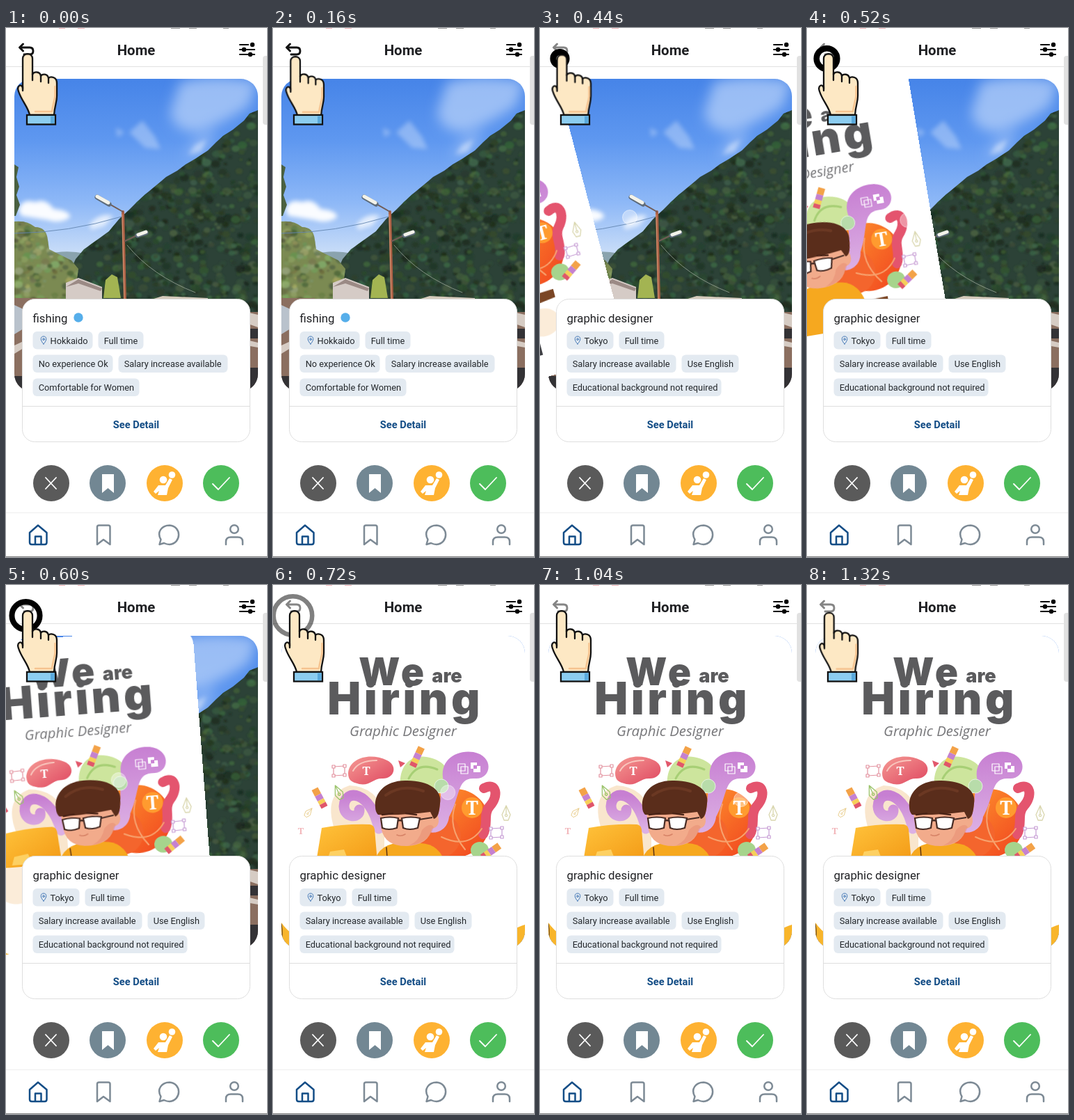
These frames come from a looping animation (375 by 760 pixels, 1.36 s). An HTML page:

```html
<!DOCTYPE html>
<html lang="en">
<head>
<meta charset="utf-8">
<title>Job cards</title>
<style>
html, body { margin: 0; width: 100%; height: 100%; overflow: hidden; background: #fff; }
svg { position: absolute; left: 0; top: 0; width: 375px; height: 760px; overflow: hidden; }
svg * { animation-duration: 1360ms; animation-iteration-count: infinite; animation-timing-function: linear; }
text { font-family: Roboto, sans-serif; fill: #202124; }
.chip text { font-size: 12.8px; fill: #24282c; }
.chip rect { fill: #e3eaf1; }
.role { font-size: 16.8px; }
.line { fill: none; stroke-linecap: round; stroke-linejoin: round; }
.black { font-family: Inter, sans-serif; font-weight: 900; fill: #5b5b5d; }
.serif { font-family: "Noto Serif", serif; font-weight: 700; fill: #fff; text-anchor: middle; }

.before { animation-name: before; }
.after { animation-name: after; }
#photo { animation-name: photo; }
#card { transform-origin: 187px 297px; animation-name: card; }
#ring { animation-name: ring; }
#touch { animation-name: touch; }
#hand { transform-origin: 73px 139px; animation-name: press; }

@keyframes before { 0%, 26.46% { opacity: 1 } 26.47%, 100% { opacity: 0 } }
@keyframes after { 0%, 26.46% { opacity: 0 } 26.47%, 100% { opacity: 1 } }
@keyframes photo { 0%, 49.26% { opacity: 1 } 49.27%, 100% { opacity: 0 } }
@keyframes card {
  0%, 26.46% { transform: translateX(-600px) }
  26.47% { transform: translateX(-400px) rotate(-20.5deg) }
  32.35% { transform: translateX(-287px) rotate(-14.7deg) }
  44.12% { transform: translateX(-78px) rotate(-4.4deg) }
  49.26%, 100% { transform: none }
}
@keyframes ring {
  0%, 26.46% { r: 5px; stroke-width: 9px; opacity: 0 }
  26.47% { r: 5px; stroke-width: 9px; opacity: 1 }
  32.35% { r: 9.5px; stroke-width: 9px }
  44.12% { r: 20px; stroke-width: 8px; opacity: 1 }
  52.94% { r: 27.7px; stroke-width: 6.5px; opacity: .5 }
  61.76%, 100% { r: 33px; stroke-width: 5px; opacity: 0 }
}
@keyframes touch {
  0%, 11.76% { transform: translate(129px, 272px); opacity: 0 }
  17.65%, 33% { transform: translate(129px, 272px); opacity: 1 }
  44.12% { transform: translate(161px, 280px) }
  52.94% { transform: translate(251px, 298px) }
  64.7% { transform: translate(286px, 307px) }
  76.47% { transform: translate(289px, 308px); opacity: 1 }
  82.35%, 100% { transform: translate(289px, 308px); opacity: 0 }
}
@keyframes press {
  0% { transform: none }
  17.6%, 22% { transform: scale(.96, .943) }
  32.35% { transform: scale(.99, .985) }
  38.24%, 85.3% { transform: none }
  97.06%, 100% { transform: scale(.98, .973) }
}
</style>
</head>
<body>

<!-- Landscape photo -->
<svg id="photo" viewBox="0 0 375 760">
  <defs>
    <linearGradient id="sky" x2="0" y2="1">
      <stop offset="0" stop-color="#4684e8"/><stop offset=".2" stop-color="#5f98f0"/>
      <stop offset=".4" stop-color="#8fb9f7"/><stop offset=".55" stop-color="#c6dbf8"/>
    </linearGradient>
    <filter id="soft" x="-40%" y="-40%" width="180%" height="180%"><feGaussianBlur stdDeviation="9"/></filter>
    <filter id="haze" x="-30%" y="-30%" width="160%" height="160%"><feGaussianBlur stdDeviation="3"/></filter>
    <filter id="fine"><feGaussianBlur stdDeviation=".8"/></filter>
    <clipPath id="frame"><rect x="12" y="73" width="350" height="449" rx="25"/></clipPath>
    <clipPath id="hillClip"><path id="hillPath" d="M362 118L350 123 342 133 326 146 312 155 302 164 290 176 272 188 258 196 246 205 230 214 216 226 200 239 188 250 176 262 162 275 148 292 130 305 112 318 100 332 92 350 88 365V410H362Z"/></clipPath>
    <clipPath id="bushClip"><path id="bushPath" d="M12 278Q30 276 42 286 58 286 60 304L62 318 78 326 94 334 104 346 100 375 80 395H12Z"/></clipPath>
  </defs>
  <g clip-path="url(#frame)">
    <path fill="url(#sky)" d="M0 73H375V522H0Z"/>
    <g filter="url(#soft)" fill="#b4cff8">
      <path opacity=".75" d="M250 78Q290 65 362 76L350 112Q310 138 275 150 240 148 236 122Z"/>
      <path opacity=".6" d="M255 188L268 165 300 145 290 172Z"/>
    </g>
    <g filter="url(#haze)" fill="#fff">
      <path opacity=".95" d="M18 262Q22 244 42 250 58 244 68 260 92 262 92 272 78 282 60 276L22 270Z"/>
      <path opacity=".7" d="M120 282Q136 264 154 270L142 284 122 290Z"/>
      <path opacity=".3" d="M177 150L196 133 214 156 222 174 200 172ZM158 143L170 150 160 157Z"/>
      <path opacity=".4" d="M262 182L272 168 288 160 280 178Z"/>
    </g>
    <path fill="#8aa3ae" d="M58 325Q85 318 114 324L120 345H60Z"/>
    <use href="#hillPath" fill="#2c4237"/>
    <g clip-path="url(#hillClip)"><g id="hill" filter="url(#fine)"></g></g>
    <use href="#bushPath" fill="#7b8a52"/>
    <g clip-path="url(#bushClip)"><g id="bush" filter="url(#fine)"></g></g>
    <path fill="#4a6040" d="M12 196L18 200 15 214 19 228 15 240 20 254 14 270H12Z"/>
    <path fill="#d5cbc6" d="M86 366L104 359 138 372V392H86Z"/>
    <path fill="#9b8a85" d="M86 372L104 361 138 374 136 378 104 367Z"/>
    <path fill="#a3b452" d="M140 388L143 362 152 354 160 358 165 388Z"/>
    <path fill="#d5cabb" d="M206 391L225 385 290 388V402H206Z"/>
    <path fill="#8b6f60" d="M0 388H60V522H0ZM340 408H362V522H340Z"/>
    <path fill="#b9c2cc" d="M12 398L25 404V432L12 440Z"/>
    <path fill="#d6ccc4" d="M12 456L25 450V460L12 468ZM345 408L362 412V430L345 424ZM345 448L362 452V459L345 456Z"/>
    <path fill="#333235" d="M12 500H30V522H12ZM345 432H362V446H345ZM345 488H362V522H345Z"/>
    <path class="line" stroke="#6486b0" stroke-width=".9" d="M12 295Q90 294 166 271"/>
    <path class="line" stroke="#8e9a8c" stroke-width=".9" d="M174 312Q210 356 272 380"/>
    <path class="line" stroke="#ad6045" stroke-width="4" d="M168 264L171 392"/>
    <path class="line" stroke="#d59a78" stroke-width="1" d="M167 268L170 390"/>
    <path class="line" stroke="#705c56" stroke-width="2" d="M147 252L168 264M171 306L188 298"/>
    <path class="line" stroke="#5d6b7a" stroke-width="7" d="M131 243L148 253M189 298L201 294"/>
    <path class="line" stroke="#f3f3ea" stroke-width="5" d="M131 242L147 251M190 297L201 293"/>
  </g>
</svg>

<!-- Returning card -->
<svg viewBox="0 0 375 760">
  <defs>
    <clipPath id="cardClip"><rect x="12" y="73" width="350" height="449" rx="25"/></clipPath>
    <linearGradient id="warm" x2="1" y2="1"><stop stop-color="#ff9a2e"/><stop offset="1" stop-color="#f0411f"/></linearGradient>
    <linearGradient id="rose" x2="1" y2="1"><stop stop-color="#f59a94"/><stop offset="1" stop-color="#df4760"/></linearGradient>
    <linearGradient id="lilac" x2="0" y2="1"><stop stop-color="#c77fd2"/><stop offset="1" stop-color="#dcb0e4"/></linearGradient>
    <linearGradient id="gold" x2="1" y2="1"><stop stop-color="#ffc33b"/><stop offset="1" stop-color="#f39a16"/></linearGradient>
    <g id="crop" class="line" stroke-width="1.2">
      <path d="M-8-6L8-7 8 6-8 7Z"/><path d="M-10-8h4v4h-4zM6-9h4v4h-4zM6 4h4v4h-4zM-10 5h4v4h-4z" fill="#fff"/>
    </g>
    <g id="stripes">
      <path fill="#f3a248" d="M-5-15H5V-5H-5Z"/><path fill="#c581cf" d="M-5-5H5V3H-5Z"/>
      <path fill="#f6cf58" d="M-5 3H5V9H-5Z"/><path fill="#e0566a" d="M-5 9H5V15H-5Z"/>
    </g>
    <g id="nib" class="line" stroke-width="1.3"><path d="M0-11L6 2 3 10H-3L-6 2ZM0-11V1"/><circle cy="3" r="1.6"/></g>
  </defs>
  <g id="card">
    <rect x="12" y="73" width="350" height="449" rx="25" fill="#fff"/>
    <g clip-path="url(#cardClip)">
      <g text-anchor="middle">
        <text class="black" x="172" y="144" font-size="55" letter-spacing="4">We</text>
        <text class="black" x="250" y="140" font-size="27">are</text>
        <text class="black" x="190" y="186" font-size="64" letter-spacing="4.5">Hiring</text>
        <text x="187" y="217" font-size="20.4" font-style="italic" style="font-family:'Open Sans',sans-serif;fill:#77777a">Graphic Designer</text>
      </g>

      <path fill="#f9e6cd" d="M88 350Q72 300 110 288 150 290 160 330V395H90Z"/>
      <ellipse cx="82" cy="424" rx="30" ry="27" fill="#fbecd9"/>
      <ellipse cx="255" cy="445" rx="24" ry="20" fill="#fbecd9"/>
      <path class="line" stroke="url(#lilac)" stroke-width="15" d="M152 350C140 295 103 292 102 318 103 336 125 335 124 323"/>
      <path fill="#cde59d" d="M183 290C180 255 203 240 229 249 257 258 255 280 242 290L220 306Z"/>
      <path class="line" stroke="#a7cf75" stroke-width="3" d="M195 278Q208 253 236 265"/>
      <circle cx="262" cy="342" r="49" fill="url(#warm)"/>
      <circle cx="238" cy="360" r="32" fill="#f4652d"/>
      <ellipse cx="297" cy="381" rx="13" ry="12" fill="#a6d48c"/>
      <path class="line" stroke="#e4546e" stroke-width="14" d="M303 292C322 282 324 304 312 317 301 329 310 343 302 358"/>
      <path fill="url(#lilac)" d="M245 281C238 253 262 236 288 240 319 246 314 280 290 278 264 276 270 302 253 333 250 360 220 359 219 350 247 337 236 309 245 281Z"/>
      <path class="line" stroke="#f7a26e" stroke-width="2" d="M242 362Q280 380 300 350M262 315Q250 348 276 380"/>
      <circle cx="286" cy="320" r="15" fill="#ff9b2f"/>
      <text class="serif" x="286" y="330" font-size="27">T</text>
      <path fill="url(#rose)" d="M108 270C110 248 140 240 164 252 180 260 174 278 158 278 144 277 140 289 124 286 112 283 108 280 108 270Z"/>
      <path class="line" stroke="#f9c6bd" stroke-width="2" d="M115 267Q123 252 149 252"/>
      <text class="serif" x="134" y="273" font-size="17">T</text>
      <path class="line" stroke="#fff" stroke-width="1.2" d="M266 257h10v10h-10zM270 261h10v10h-10z"/>
      <path fill="#fff" d="M284 255H293V260H298V269H288V264H284Z"/>
      <path fill="#cb83d5" d="M288 259H293V264H288Z"/>
      <circle cx="242" cy="289" r="10" fill="#b8dcaa" stroke="#e4f3df"/>

      <use href="#crop" x="95" y="267" stroke="#e3929f"/>
      <use href="#crop" x="321" y="356" stroke="#c59ad3"/>
      <use href="#stripes" transform="translate(207 247) rotate(25)"/>
      <use href="#stripes" transform="translate(67 306) rotate(-28)"/>
      <use href="#stripes" transform="translate(313 383) rotate(55)"/>
      <use href="#nib" transform="translate(94 298) rotate(-25)" fill="#b6d68b" stroke="#9bc36b"/>
      <use href="#nib" transform="translate(335 328)" stroke="#d9d6ae"/>
      <use href="#nib" transform="translate(51 327) rotate(40) scale(.7)" stroke="#e9ce8e"/>
      <path fill="#e2586c" d="M180 252L190 256 183 262Z"/>
      <text class="serif" x="40" y="358" font-size="13" style="fill:#f2b8bc">T</text>

      <path fill="#f6a81f" d="M142 412Q147 372 180 371H212Q240 372 248 402V440H142Z"/>
      <path class="line" stroke="#5c3312" stroke-width="1.5" d="M163 377L164 391"/>
      <path fill="url(#gold)" d="M70 349Q102 343 139 344 145 345 146 351L150 398H62Z"/>
      <path fill="#ffdc77" opacity=".75" d="M82 383L102 380 108 395H78Z"/>
      <path fill="#f2ab8b" d="M152 318Q154 301 190 300 232 300 233 328 238 328 238 340 237 349 228 350 224 373 193 375 162 376 156 352Z"/>
      <path fill="#e88c72" opacity=".5" d="M214 352Q226 340 231 348 222 372 196 374 210 368 214 352Z"/>
      <path fill="#5a2d1b" d="M147 319C145 300 160 281 190 281 222 280 244 294 240 314 239 326 237 335 231 336L226 326Q190 331 151 330Q147 326 147 319Z"/>
      <path class="line" stroke="#774029" stroke-width="4" opacity=".6" d="M162 302Q185 285 216 296"/>
      <path class="line" stroke="#4a2417" stroke-width="2.5" d="M157 330L172 328M191 328L206 330"/>
      <g fill="#fff" stroke="#472c25" stroke-width="2.2">
        <path d="M155 335Q168 332 180 335L178 349Q166 353 157 349ZM185 335Q198 332 211 335L208 349Q196 353 187 349Z"/>
        <path fill="none" d="M180 339Q182 337 185 339M210 337L229 334"/>
      </g>
      <path class="line" stroke="#d78367" stroke-width="1.6" d="M178 359Q184 362 190 358"/>
      <path fill="#7a4625" d="M235 404L281 402V414L235 420Z"/>
      <path fill="#3f4044" d="M238 468H243V490H238Z"/>
      <path fill="#f8b52b" d="M12 485Q26 506 64 522H12ZM362 488Q345 492 310 522H362Z"/>
      <path class="line" stroke="#6c4c22" stroke-width="1.2" d="M12 487Q14 497 13 505"/>
    </g>
  </g>
  <g id="touch"><circle r="10.5" fill="#fff" fill-opacity=".38" stroke="#fff" stroke-opacity=".5"/></g>
</svg>

<!-- Interface -->
<svg viewBox="0 0 375 760">
  <defs><path id="undo" d="M24.500 23L19.500 28 24.500 33M20 28H34Q39 28 39 33T34 38H26"/></defs>
  <path fill="#fff" d="M0 0H375V55H0Z"/>
  <path stroke="#e2e2e2" d="M0 55.5H375"/>
  <path fill="#f4b9bd" d="M76 0h9v1h-9zM103 0h10v1h-10z"/>
  <path fill="#9c9c9c" d="M237 0h13v1h-13zM263 0h11v1h-11zM312 0h8v1h-8z"/>
  <text x="187" y="38.5" font-size="20.4" font-weight="700" text-anchor="middle">Home</text>
  <g class="line" stroke="#000" stroke-width="2.2">
    <path d="M336 24H348M336 31H339M346 31H357M336 38H347M354 38H357"/>
    <g fill="#000" stroke="none"><circle cx="354" cy="24" r="3.2"/><circle cx="342" cy="31" r="3.2"/><circle cx="351" cy="38" r="3.2"/></g>
  </g>
  <rect x="369" y="40" width="12" height="99" rx="4" fill="#e1e1e1"/>
  <g class="line" stroke-width="2.9">
    <use href="#undo" class="before" stroke="#111"/>
    <use href="#undo" class="after" stroke="#858585"/>
  </g>

  <rect x="23.500" y="389.500" width="327" height="205" rx="18" fill="#fff" stroke="#dedede"/>
  <path stroke="#dedede" d="M24 543.500H350"/>
  <text x="187" y="575" font-size="14.6" font-weight="700" text-anchor="middle" style="fill:#124c85">See Detail</text>
  <g class="before">
    <text class="role" x="38.500" y="423">fishing</text>
    <circle cx="104" cy="416" r="6.700" fill="#56aeea"/>
    <g id="jobA"></g>
  </g>
  <g class="after">
    <text class="role" x="38.500" y="423">graphic designer</text>
    <g id="jobB"></g>
  </g>

  <circle cx="65" cy="654" r="26" fill="#5a5a5a"/>
  <circle cx="146" cy="654" r="26" fill="#728793"/>
  <circle cx="228" cy="654" r="26" fill="#feb232"/>
  <circle cx="309" cy="654" r="26" fill="#4dbd5b"/>
  <path class="line" stroke="#fff" stroke-width="1.8" d="M57 646L72 662M72 646L57 662M297 655L305 663 321 646"/>
  <path fill="#fff" d="M138 641H155V668L146.500 661 138 668Z"/>
  <g fill="#fff">
    <circle cx="226" cy="649" r="5.300"/><circle cx="238.500" cy="642" r="4.800"/>
    <path d="M218 671L220 665 215 669 212 666 219 657H229L235 647 239 649 233 661 231 671Z"/>
  </g>

  <path stroke="#eee" d="M0 696.500H375"/>
  <path stroke="#858585" d="M0 759.500H375"/>
  <g class="line" stroke="#7d8a95" stroke-width="2.5">
    <path stroke="#134d86" d="M34 725L46 714.500 58.500 725V739Q58.500 742 55.500 742H37Q34 742 34 739ZM42 742V730.500H50.500V742"/>
    <path d="M131 717Q131 714.500 133.500 714.500H147Q149.500 714.500 149.500 717V742L140 735 131 742Z"/>
    <path d="M220.500 742L222.500 735C216 724 224 714.500 235 714.500 252.500 716 252.500 740 235 742 231 742 229 741 227 740Z"/>
    <circle cx="328" cy="720" r="5.800"/>
    <path d="M316 742V738Q316 731.500 323 731.500H333Q340 731.500 340 738V742"/>
  </g>

  <circle id="ring" cx="28.500" cy="44" fill="none" stroke="#000"/>
  <g id="hand" class="line" stroke="#111" stroke-width="2.3">
    <path fill="#fde8c4" d="M24 88V44C24 35 38 35 38 44V67C40 62 49 62 50 69 52 65 60 66 61 72 64 69 73 70 73 79V97C73 108 70 110 69 125H34C32 114 22 104 18 91 15 83 22 79 24 86Z"/>
    <path stroke="#f6c38f" stroke-width="2.5" d="M70.500 84V98C69 107 67 111 66 120H42"/>
    <path d="M24 84V90M38 66V75M50 69V77M61 72V79"/>
  </g>
  <rect x="30" y="125" width="41" height="13.500" fill="#8ccdf0" stroke="#111" stroke-width="2.300"/>
  <path fill="#5aa9dc" d="M64 126.500H69.500V137H64Z"/>
</svg>

<script>
const byId = id => document.getElementById(id);

// Chips: [x, y, width, label, has pin]
function chips(id, list) {
  byId(id).innerHTML = list.map(([x, y, w, label, pin]) => `
    <g class="chip"><rect x="${x}" y="${y}" width="${w}" height="25.500" rx="6"/>
    ${pin ? `<g transform="translate(${x + 15.5} ${y + 12.5})" class="line" stroke="#3f74b4">
      <path d="M0 5.500C-6-1-4-5.500 0-5.500S6-1 0 5.500Z"/><circle cy="-1.300" r="1.300"/></g>` : ""}
    <text x="${x + (pin ? 25 : 8.2)}" y="${y + 17.5}">${label}</text></g>`).join("");
}
chips("jobA", [
  [38.5, 436, 86, "Hokkaido", true], [132.5, 436, 65, "Full time"],
  [38.5, 469.5, 115, "No experience Ok"], [161.5, 469.5, 157, "Salary increase available"],
  [38.5, 503.5, 153, "Comfortable for Women"]
]);
chips("jobB", [
  [38.5, 436, 67, "Tokyo", true], [113.5, 436, 65, "Full time"],
  [38.5, 469.5, 157, "Salary increase available"], [203.5, 469.5, 82, "Use English"],
  [38.5, 503.5, 222, "Educational background not required"]
]);

// Seeded foliage
let seed = 7;
const rand = () => (seed = seed * 16807 % 2147483647) / 2147483647;
function foliage(id, n, x, y, w, h, hue, light, spread) {
  let out = "";
  for (let i = 0; i < n; i++) {
    const l = light + (rand() - .5) * spread, r = 2 + rand() * 5;
    out += `<ellipse cx="${x + rand() * w}" cy="${y + rand() * h}" rx="${r}" ry="${r * .8}"
      fill="hsl(${hue + rand() * 50},${16 + rand() * 16}%,${l}%)" opacity=".7"/>`;
  }
  byId(id).innerHTML = out;
}
foliage("hill", 900, 90, 115, 272, 290, 95, 23, 24);
foliage("bush", 180, 12, 270, 100, 125, 55, 44, 34);
</script>
</body>
</html>
```
